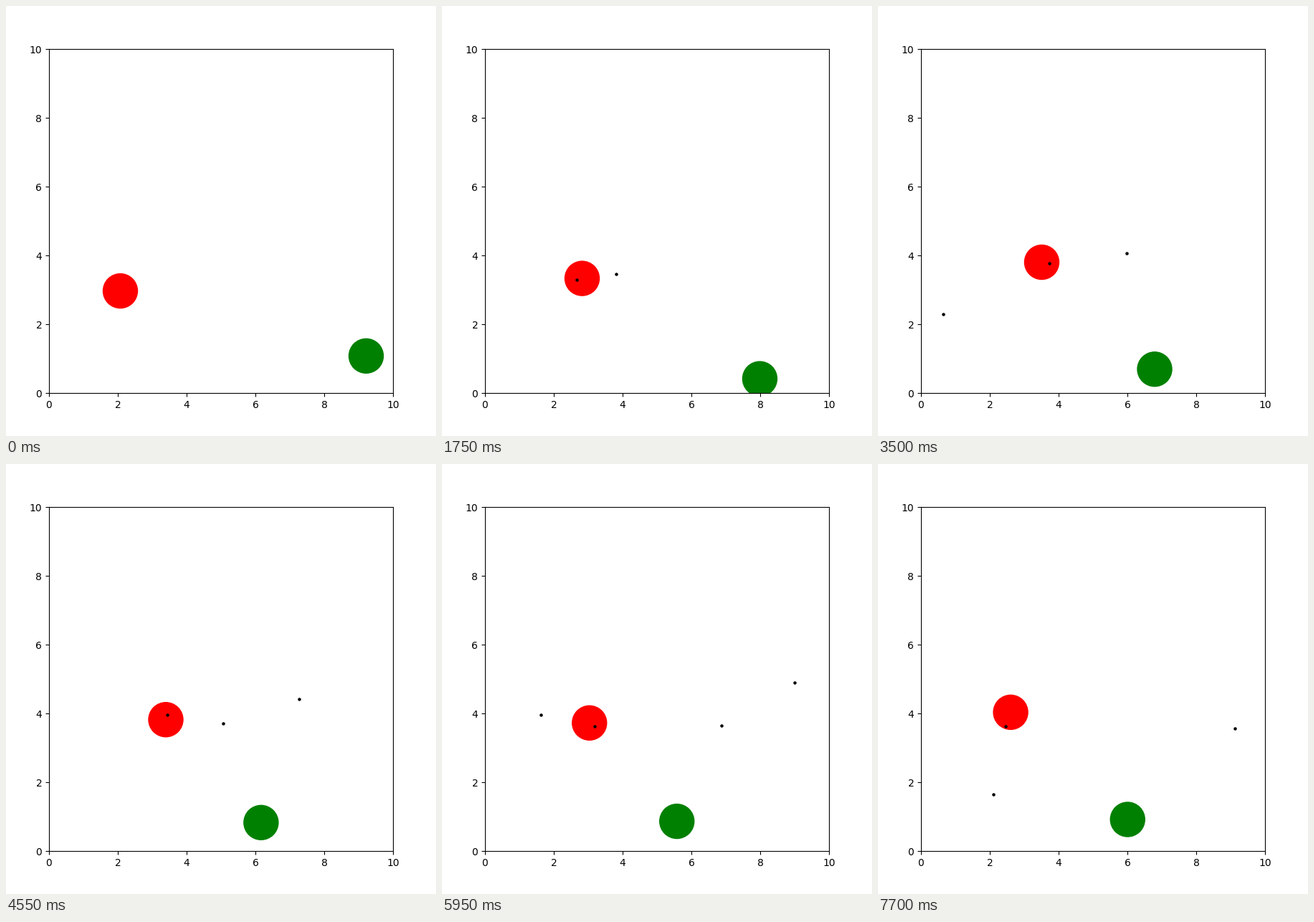
Write a matplotlib script that moves like this. It is 600x600 px and loops after 8 s.

```python
import numpy as np
import matplotlib.pyplot as plt
from matplotlib.animation import FuncAnimation

INTERVAL = 50      # ms per frame
HOLD = 7           # frames between two moves
FRAMES = 160
RELOAD = 4         # moves between two shots
SPEED = 0.45       # bullet distance per move

# Turning points: move, x, y
RED = np.array([
    (0, 2.073, 2.967), (3, 2.523, 3.417), (4, 2.673, 3.288),
    (5, 2.823, 3.331), (9, 3.423, 3.931), (10, 3.51, 3.802),
    (12, 3.429, 3.963), (15, 3.329, 3.529), (19, 2.744, 3.917),
    (21, 2.456, 4.185), (22, 2.606, 4.033),
])
GREEN = np.array([
    (0, 9.219, 1.077), (3, 8.483, 0.423), (7, 7.5, 0.556),
    (10, 6.792, 0.692), (15, 5.84, 0.881), (19, 5.506, 0.844),
    (22, 6.006, 0.917),
])
AIM = np.radians([15.6, 206.25, -2.05, 180.3, 241.3, 250.6])


def zigzag(path, move):
    """Straight legs between turning points."""
    t = path[:, 0]
    return np.array([np.interp(move, t, v) for v in path.T[1:]])


def glide(path, move):
    """Smooth Hermite curve through turning points."""
    t, points = path[:, 0], path[:, 1:]
    slope = np.gradient(points, t, axis=0)
    i = min(np.searchsorted(t, move, side="right") - 1, len(t) - 2)
    span = t[i + 1] - t[i]
    u = (move - t[i]) / span
    ease = u * u * (3 - 2 * u)
    return (points[i] * (1 - ease) + points[i + 1] * ease
            + span * u * (1 - u) * ((1 - u) * slope[i] - u * slope[i + 1]))


def bullets(move):
    """Positions of all shots fired so far, each starting at the red disc."""
    points = []
    for i, angle in enumerate(AIM):
        start = RELOAD * i
        age = move - start - 1
        if age >= 0:
            step = SPEED * np.array([np.cos(angle), np.sin(angle)])
            points.append(zigzag(RED, start) + age * step)
    return np.array(points).reshape(-1, 2)


fig = plt.figure(figsize=(6, 6), dpi=100)
ax = fig.add_axes([0.1, 0.1, 0.8, 0.8])
ax.set(xlim=(0, 10), ylim=(0, 10))

red = ax.add_patch(plt.Circle((0, 0), 0.5, color="red"))
green = ax.add_patch(plt.Circle((0, 0), 0.5, color="green"))
shots = ax.scatter([], [], s=5, color="black", zorder=2)


def update(frame):
    move = frame // HOLD
    red.center = zigzag(RED, move)
    green.center = glide(GREEN, move)
    shots.set_offsets(bullets(move))
    return red, green, shots


anim = FuncAnimation(fig, update, frames=FRAMES, interval=INTERVAL,
                     repeat=True, repeat_delay=0)
plt.show()
```
